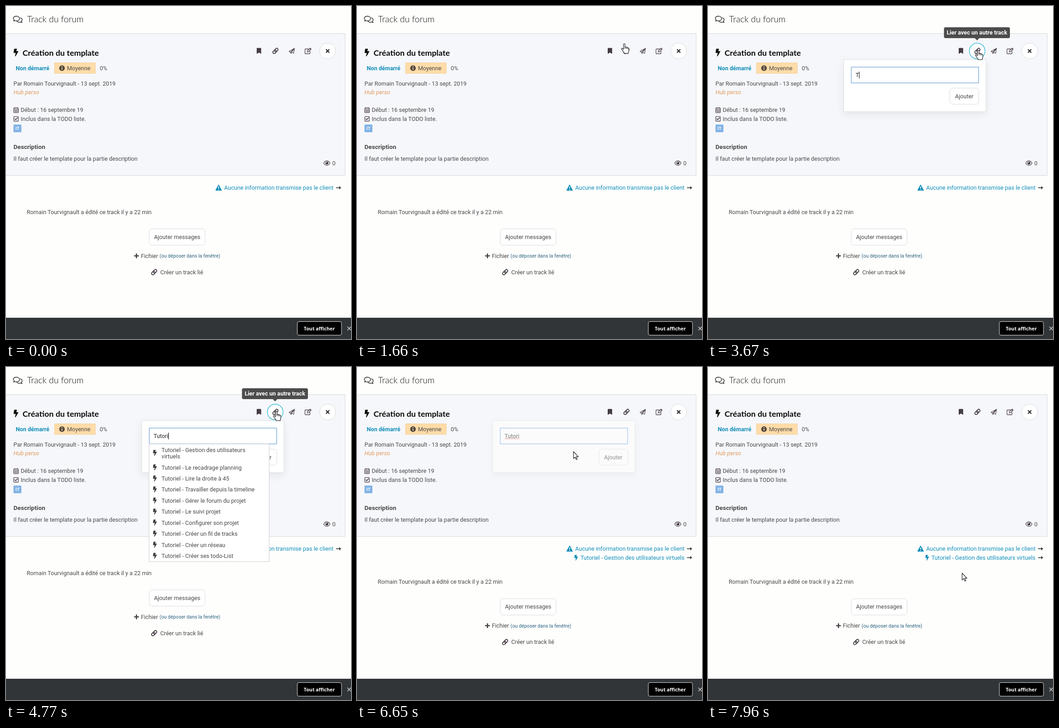
These frames come from a looping animation (761x736 px, 7.99 s). An HTML page:

```html
<!DOCTYPE html>
<html lang="fr">
<head>
<meta charset="utf-8">
<title>Track du forum</title>
<style>
  html, body { margin: 0; width: 100%; height: 100%; overflow: hidden; background: #fefefd; }
  svg { display: block; }
  text { font: 12.7px Roboto, Arial, sans-serif; fill: #494949; white-space: pre; }
  .head { font: 300 19.3px Lato, sans-serif; fill: #111; }
  .title { font: 700 17.9px Lato, sans-serif; fill: #0c0c0c; }
  .hub { font-style: italic; fill: #e09c62; }
  .badge { font-size: 9.6px; fill: #fff; }
  .section { font-size: 13.6px; }
  .note { font-size: 10.7px; fill: #2b617e; }
  .all { font: 700 10.75px 'Open Sans', sans-serif; fill: #fff; }
  .white { fill: #fff; }
  .bold { font-weight: 700; }
  .mid { text-anchor: middle; }
  .end { text-anchor: end; }
  .link { fill: #128fba; }
  .line { fill: none; stroke: #50464f; stroke-width: 1.3; stroke-linejoin: round; stroke-linecap: round; }
  .box { fill: #fff; stroke: #d9dadc; }
  .ring { fill: #fff; stroke: #27b4d4; stroke-width: 1.3; }
  #shadow { filter: drop-shadow(0 6px 9px rgba(0, 0, 0, .07)); }
</style>
</head>
<body>
<svg width="761" height="736" viewBox="0 0 761 736">
  <defs>
    <path id="bolt" d="M296 160H181L224 30C227 15 216 0 200 0H56C44 0 34 9 32 21L0 261C-2 275 10 288 24 288H143L97 483C93 498 105 512 120 512C128 512 136 508 141 500L317 196C326 180 315 160 296 160z"/>
    <g id="chain" fill="none" stroke="#483f47" stroke-width="1.8" transform="rotate(-45)">
      <rect x="-7" y="-2.9" width="8.6" height="5.8" rx="2.9"/>
      <rect x="-1.6" y="-2.9" width="8.6" height="5.8" rx="2.9"/>
    </g>
    <path id="arrow" d="M0 -.9H7V-3.7L11.3 0 7 3.7V.9H0z" fill="#3c3c3c"/>
  </defs>

  <!-- header -->
  <g class="line" style="stroke:#222">
    <path d="M23 22.5c4 0 7 2.2 7 5.2s-3 5.2-7 5.2c-1.2 0-2.3-.2-3.3-.6-1 .6-2 .9-3.2.9 1-.9 1.5-1.8 1.6-2.8-1.3-1-2-1.9-2-3.2 0-2.6 3-4.7 6.9-4.7z"/>
    <path d="M31.5 26.2c2.5.6 4.2 2.3 4.2 4.4 0 1.2-.6 2.2-1.7 3 .1 1 .7 1.9 1.6 2.8-1.3 0-2.4-.4-3.3-1-3 1-6.6.2-8.3-1.8"/>
  </g>
  <text class="head" x="46.5" y="36">Track du forum</text>

  <!-- card -->
  <rect x="-1" y="61" width="749" height="313.5" fill="#f6f7fa" stroke="#d3d5d8"/>
  <use href="#bolt" transform="translate(16.8 94.5) scale(.0325)" fill="#0c0c0c"/>
  <text class="title" x="36.5" y="109.5">Création du template</text>
  <text class="bold link" x="21.5" y="141.5">Non démarré</text>
  <rect x="107" y="125.5" width="90" height="23.5" fill="#ffdca8" stroke="#f0d0a0"/>
  <circle cx="123.5" cy="137.3" r="6.2" fill="#554a40"/>
  <path d="M123.5 133v2M123.5 136.6v4.2" stroke="#ffdca8" stroke-width="1.9"/>
  <text x="134.5" y="141.5">Moyenne</text>
  <text x="206.8" y="141.5">0%</text>
  <text x="16.5" y="175.7">Par Romain Tourvignault - 13 sept. 2019</text>
  <text class="hub" x="16.5" y="195">Hub perso</text>
  <g class="line">
    <rect x="17.1" y="225.5" width="10.2" height="10.2" rx="1"/>
    <path d="M17.5 228.8h9.5M17.5 232.2h9.5M20.6 229v6.5M23.9 229v6.5M19.7 223.8v2.5M24.8 223.8v2.5" style="stroke-width:1"/>
    <rect x="17.1" y="244.3" width="10.2" height="10.2" rx="1.2"/>
    <path d="M19.4 249.3l2 2.1 3.9-4.2" style="stroke-width:1.7"/>
  </g>
  <text x="32.5" y="234.3">Début : 16 septembre 19</text>
  <text x="32.5" y="253.9">Inclus dans la TODO liste.</text>
  <rect x="16.5" y="262" width="17.5" height="17" rx="1.5" fill="#82b3e6"/>
  <text class="bold mid badge" x="25.3" y="274">IT</text>
  <text class="bold section" x="16.5" y="316.2">Description</text>
  <text x="16.5" y="341.8">Il faut créer le template pour la partie description</text>
  <path class="line" d="M700.8 347.2c3.8-6.7 10.2-6.7 14 0-3.8 6.7-10.2 6.7-14 0z"/>
  <circle cx="707.8" cy="347" r="3.3" fill="#443c43"/>
  <circle cx="706.7" cy="345.7" r="1.1" fill="#f6f7fa"/>
  <text x="719.8" y="351.8">0</text>

  <!-- toolbar -->
  <circle id="markRing" class="ring" cx="557.5" cy="99.5" r="17.3"/>
  <circle id="linkRing" class="ring" cx="593.8" cy="99.5" r="17.3"/>
  <path d="M553 94q0-1.2 1.2-1.2h7.4q1.2 0 1.2 1.2v11.8l-4.9-2.9-4.9 2.9z" fill="#443c43"/>
  <use href="#chain" transform="translate(594.3 99.3)"/>
  <path class="line" d="M636.3 93.5L624.3 100.3l3.4 1.7 8.6-8.5-1.9 11-4.4-2-1.6 2.6-.7-3.1M630 102.5l6.3-9"/>
  <path class="line" d="M667.5 95h-7q-1 0-1 1v8.5q0 1 1 1h9q1 0 1-1v-4.5M664.5 101.5l.5-2.8 6-5.7 2.2 2.2-5.9 5.8zM669.5 94.3l2.3 2.3"/>
  <circle class="box" cx="709.5" cy="99.5" r="17.5"/>
  <path d="M705.8 95.7l7.4 7.4m0-7.4l-7.4 7.4" stroke="#2f2a2f" stroke-width="2.2"/>

  <!-- linked tracks -->
  <path d="M469 395.7l6.2 11.6h-12.4z" fill="#128fba" stroke="#128fba" stroke-width="1.5" stroke-linejoin="round"/>
  <path d="M469 398.8v4.3M469 404.5v1.9" stroke="#fff" stroke-width="1.7"/>
  <text id="info" class="link end" x="722.3" y="406">Aucune information transmise pas le client</text>
  <use href="#arrow" transform="translate(728 401.7)"/>
  <g id="added">
    <use href="#bolt" transform="translate(479.5 415.2) scale(.0245)" fill="#128fba"/>
    <text id="tuto" class="link end" x="722.3" y="425.7">Tutoriel - Gestion des utilisateurs virtuels</text>
    <use href="#arrow" transform="translate(728 421.3)"/>
  </g>

  <!-- thread -->
  <g id="thread">
    <text x="45.8" y="459.9">Romain Tourvignault a édité ce track il y a 22 min</text>
    <rect class="box" x="316" y="492.5" width="123" height="36" rx="6"/>
    <text class="mid" x="377.5" y="514.7">Ajouter messages</text>
    <path d="M282.5 552.2h10.6M287.8 546.9v10.6" stroke="#483f47" stroke-width="2.6"/>
    <text x="297.5" y="556.7">Fichier</text>
    <text class="note" x="338.8" y="556.3">(ou déposer dans la fenêtre)</text>
    <use href="#chain" transform="translate(326.8 588.3)"/>
    <text x="340.2" y="592.8">Créer un track lié</text>
  </g>

  <!-- footer -->
  <rect y="689" width="761" height="47" fill="#323538"/>
  <rect id="showAll" x="642.5" y="697.5" width="97.5" height="30" rx="3.5" stroke="#e8e8e8"/>
  <text class="mid all" x="691" y="717">Tout afficher</text>
  <path d="M753 708.8l8 8m0-8l-8 8" stroke="#c6c8ca" stroke-width="1.6"/>

  <!-- search popover -->
  <g id="popover">
    <rect id="shadow" x="299.5" y="118.5" width="313.5" height="115" fill="#fff" stroke="#dedfe1"/>
    <rect x="316" y="135" width="281" height="35" fill="#fff" stroke="#7eabdb" stroke-width="1.4"/>
    <text id="hint" x="325.5" y="157" style="fill:#c4c4c4">Rechercher...</text>
    <text id="typed" x="325.5" y="157" style="fill:#222"></text>
    <path id="spell" fill="none" stroke="#e03030"/>
    <rect id="caret" y="145" width="1" height="15"/>
    <rect class="box" x="533.5" y="181.5" width="64" height="35.5" rx="6"/>
    <text class="mid" x="565.3" y="203.5">Ajouter</text>
  </g>
  <g id="menu">
    <rect x="315.5" y="170" width="265" height="260" fill="#fff" stroke="#cbcccd"/>
  </g>

  <g id="tip">
    <rect x="520.5" y="47" width="145.5" height="24" rx="3.5" fill="#4c4c4c"/>
    <path d="M588.5 71h10l-5 5z" fill="#4c4c4c"/>
    <text class="bold mid white" x="593.2" y="63.3">Lier avec un autre track</text>
  </g>

  <g id="cursor" fill="#fff" stroke="#111" stroke-width="1.1" stroke-linejoin="round">
    <path id="hand" d="M-1.6 12.5V1.3a1.6 1.6 0 0 1 3.2 0V8a1.5 1.5 0 0 1 3 .3v.6a1.5 1.5 0 0 1 3 .4v.7a1.4 1.4 0 0 1 2.6.5V14c0 3-1.4 4-1.4 7.3H0C0 19-2.5 17-4 14.6c-.8-1.3-1.6-2.3-2-3.1-.5-1.4 1.3-2.3 2.3-1.2zM1.6 7v4M4.6 8.5v3M7.6 9.5v2"/>
    <path id="pointer" d="M0 0V15.4l3.5-3.2 2.6 5.6 2.3-1-2.5-5.4h4.8z"/>
  </g>
</svg>

<script>
const LOOP = 7990;
const NS = 'http://www.w3.org/2000/svg';
const ui = {};
for (const node of document.querySelectorAll('svg > [id], svg > g [id]')) ui[node.id] = node;

// time, x, y of the pointer tip
const PATH = [
  [430, 690, 730], [520, 665, 690], [640, 630, 520], [740, 607, 350], [830, 597, 270],
  [950, 570, 130], [1030, 562, 90], [1100, 566, 64], [1200, 587, 73], [1630, 587, 73],
  [1660, 589.5, 83.5], [1900, 596, 97.5], [5680, 596, 97.5], [5760, 588, 99], [5900, 566, 102],
  [6050, 561.5, 118.5], [6170, 525, 160], [6290, 480, 196.5], [6430, 480, 196.5],
  [6600, 477.5, 187], [7570, 477.5, 187], [7680, 442, 245], [7760, 478, 310],
  [7820, 525, 350], [7900, 552, 412], [7960, 560.5, 455.5]
];
const HAND = [[455, 510], [930, 1070], [1640, 6080], [6200, 6430], [7880, 7925]];
const KEYS = [[3670, 'T'], [3900, 'Tu'], [4280, 'Tut'], [4380, 'Tuto'], [4660, 'Tutor'], [4770, 'Tutori']];
const ITEMS = ['Le recadrage planning', 'Lire la droite à 45', 'Travailler depuis la timeline',
  'Gérer le forum du projet', 'Le suivi projet', 'Configurer son projet', 'Créer un fil de tracks',
  'Créer un réseau', 'Créer ses todo-List'];

const clamp = v => Math.max(0, Math.min(1, v));
const within = (t, a, b) => t >= a && t < b;
const fade = (t, a, b, rise, fall = rise) => Math.min(clamp((t - a) / rise), 1 - clamp((t - b) / fall));
const show = (node, on) => node.setAttribute('visibility', on ? 'visible' : 'hidden');

function add(tag, attrs, text) {
  const node = document.createElementNS(NS, tag);
  for (const k in attrs) node.setAttribute(k, attrs[k]);
  if (text) node.textContent = text;
  ui.menu.append(node);
}
function addItem(y, lines) {
  const top = y - (lines.length - 1) * 7;
  add('use', { href: '#bolt', transform: `translate(324.3 ${y - 6.8}) scale(.026)`, fill: '#3f3f3f' });
  lines.forEach((s, i) => add('text', { x: 343, y: top + i * 14.3 + 4.6 }, s));
}
addItem(190, ['Tutoriel - Gestion des utilisateurs', 'virtuels']);
ITEMS.forEach((s, i) => addItem(222 + i * 24.43, ['Tutoriel - ' + s]));
ui.spell.setAttribute('d', 'M326 159.5' + 'l2 -2l2 2'.repeat(8));

function pointAt(t) {
  const i = PATH.findIndex(p => p[0] > t);
  if (i < 1) return PATH[i ? PATH.length - 1 : 0].slice(1);
  const [t0, x0, y0] = PATH[i - 1], [t1, x1, y1] = PATH[i];
  const k = (t - t0) / (t1 - t0);
  return [x0 + (x1 - x0) * k, y0 + (y1 - y0) * k];
}

function render(t) {
  const [x, y] = pointAt(t);
  const hand = HAND.some(([a, b]) => within(t, a, b));
  ui.cursor.setAttribute('transform', `translate(${x} ${y})`);
  show(ui.hand, t >= 430 && hand);
  show(ui.pointer, t >= 430 && !hand);

  ui.showAll.setAttribute('fill', within(t, 455, 510) ? '#26282a' : '#000');
  ui.markRing.setAttribute('opacity', Math.max(fade(t, 930, 1060, 90), fade(t, 5870, 6090, 120)));
  ui.linkRing.setAttribute('opacity', fade(t, 1690, 5780, 170));
  ui.tip.setAttribute('opacity', fade(t, 2190, 5700, 330, 200));

  ui.popover.setAttribute('opacity', fade(t, 2450, 6480, 350, 400));
  show(ui.menu, within(t, 4470, 6430));

  const word = KEYS.reduce((s, [at, v]) => t >= at ? v : s, '');
  if (ui.typed.textContent !== word) ui.typed.textContent = word;
  show(ui.hint, !word);
  show(ui.spell, t >= 5700);
  const width = word ? ui.typed.getComputedTextLength() : 0;
  ui.caret.setAttribute('x', Math.floor(325.6 + width));
  show(ui.caret, !within(t, 3330, 3670) && !within(t, 5320, 5850) && t < 6430);

  const linked = t >= 6560;
  show(ui.added, linked);
  ui.thread.setAttribute('transform', `translate(0 ${linked ? 19.6 : 0})`);
  ui.info.style.textDecoration = within(t, 7878, 7897) ? 'underline' : 'none';
  ui.tuto.style.textDecoration = within(t, 7897, 7925) ? 'underline' : 'none';
}

const start = performance.now();
function tick() {
  render((performance.now() - start) % LOOP);
  requestAnimationFrame(tick);
}
tick();
</script>
</body>
</html>
```
